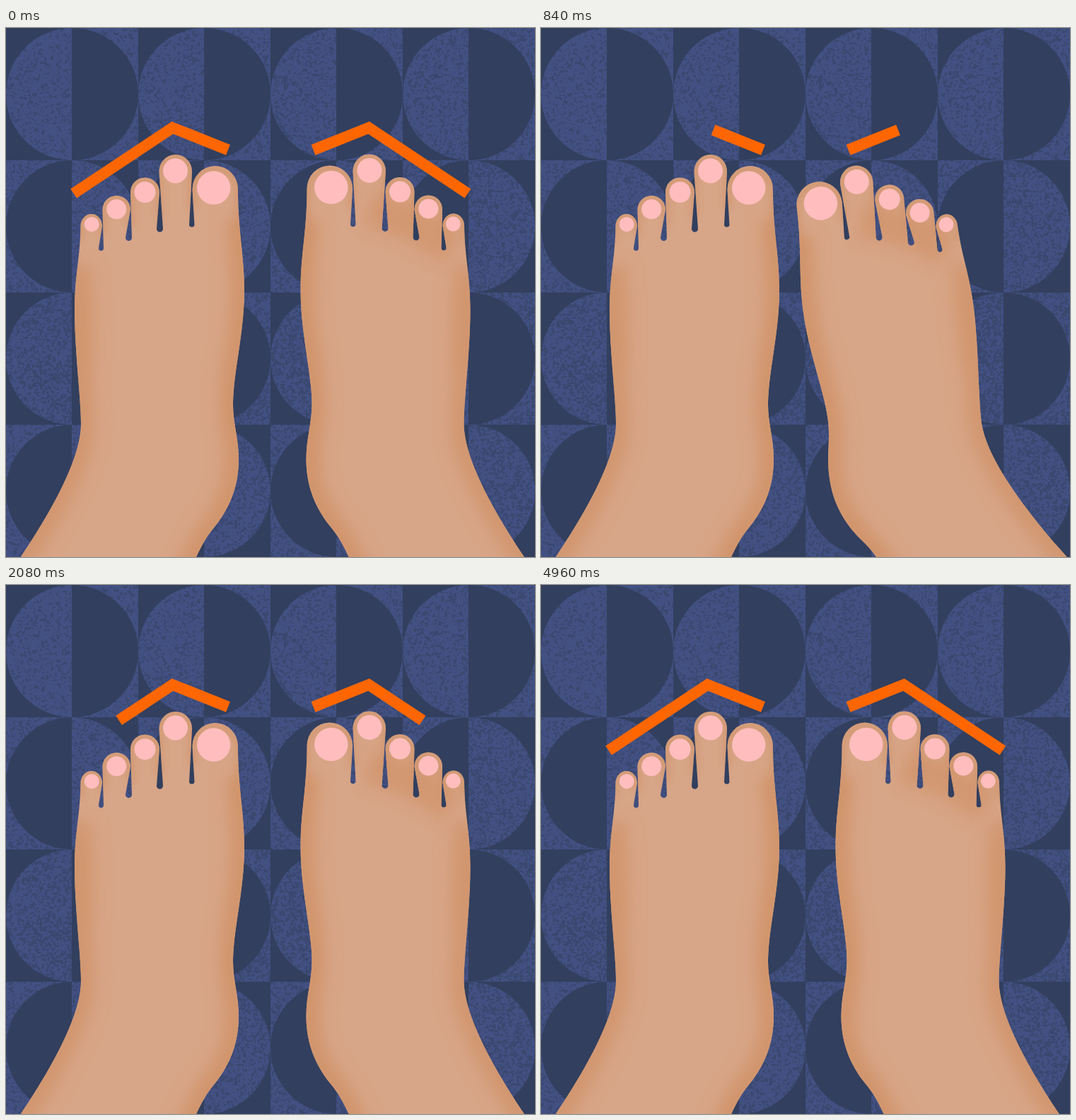
These frames come from a looping animation (748 by 748 pixels, 5000 ms). An HTML page with a canvas:

```html
<!DOCTYPE html>
<html lang="en">
<head>
<meta charset="utf-8">
<title>Feet</title>
<style>
  html, body { margin: 0; width: 100%; height: 100%; overflow: hidden; background: #323f5e; }
  canvas, svg { position: absolute; left: 0; top: 0; width: 748px; height: 748px; display: block; }
</style>
</head>
<body>
<canvas id="tiles" width="748" height="748"></canvas>
<svg viewBox="0 0 748 748">
  <defs>
    <path id="outline" d="M-49 850L21 748C57 694 106 613 106 560C106 525 97 455 97 400C97 350 105 325 105.5 280
      A15.25 17 0 0 1 136 280L131 311A3.5 3.5 0 0 0 138 312
      L136.5 257A19.75 20 0 0 1 176 257L169 296A4.5 4.5 0 0 0 178 297
      L176 232A20.5 20.5 0 0 1 217 232L213 284A4.5 4.5 0 0 0 222 284
      L216.5 203A23.25 24 0 0 1 263 203L259 279A4 4 0 0 0 266.5 279
      L263.5 228A32.25 33 0 0 1 328 228
      C328 290 337 320 337 372C337 430 321 490 321 532C321 560 329 580 329 610C329 650 315 680 296 704C284 718 277 731 269 748L226 835Z"/>
    <clipPath id="skin"><use href="#outline"/></clipPath>
    <filter id="soft" filterUnits="userSpaceOnUse" x="-60" y="150" width="460" height="720"><feGaussianBlur stdDeviation="11"/></filter>
    <filter id="fine" filterUnits="userSpaceOnUse" x="60" y="150" width="300" height="200"><feGaussianBlur stdDeviation="4"/></filter>
    <g id="foot">
      <use href="#outline" fill="#d7a587"/>
      <g clip-path="url(#skin)" fill="none" stroke="#d1946c">
        <g filter="url(#soft)" stroke-width="40">
          <path d="M-49 850L21 748C57 694 106 613 106 560C106 525 97 455 97 400C97 375 101 355 103 335" opacity=".85"/>
          <path d="M330 270C333 310 337 330 337 372C337 430 321 490 321 532C321 560 329 580 329 610C329 650 315 680 296 704C284 718 277 731 269 748L226 835"/>
          <path d="M112 370V480" stroke-width="28" opacity=".6"/>
        </g>
        <g filter="url(#fine)" stroke-width="9" opacity=".75">
          <path d="M105 300V280A15.25 17 0 0 1 136 280V292M137 280V257A19.75 20 0 0 1 176 257V280M177 275V232A20.5 20.5 0 0 1 217 232V268M217 268V203A23.25 24 0 0 1 263 203V255M264 255V228A32.25 33 0 0 1 328 228V290"/>
        </g>
      </g>
    </g>
    <g id="nails" fill="#ffbdbd">
      <circle cx="121.2" cy="277.7" r="10.5"/>
      <circle cx="156.2" cy="256.3" r="14"/>
      <circle cx="196.5" cy="232.2" r="15"/>
      <circle cx="239.5" cy="202" r="17.5"/>
      <circle cx="293.7" cy="226" r="23.7"/>
    </g>
    <path id="chevron" d="M314 172.3L235.5 141L95.6 234"/>
  </defs>
  <use href="#foot"/>
  <use href="#nails"/>
  <g id="right">
    <g transform="translate(753.5 -.6) scale(-1 1)">
      <use href="#foot"/>
      <g clip-path="url(#skin)">
        <path d="M240 255L175 278L122 312" fill="none" stroke="#d1946c" stroke-width="50" opacity=".8" filter="url(#soft)"/>
      </g>
      <use href="#nails"/>
    </g>
  </g>
  <g id="marks" fill="none" stroke="#ff6600" stroke-width="15.8" stroke-miterlimit="8">
    <use href="#chevron"/>
    <use href="#chevron" transform="translate(748.5 0) scale(-1 1)"/>
  </g>
</svg>
<script>
const LOOP = 5000, STEP = 40, TILE = 187, R = TILE / 2;
const right = document.getElementById('right');
const marks = document.getElementById('marks');
const fullLength = document.getElementById('chevron').getTotalLength();
const clamp = v => Math.max(0, Math.min(1, v));

// Half circles in alternating rows, with seeded speckles on the lighter colour.
function drawTiles() {
  const size = 748, cell = 2.2, cols = Math.ceil(size / cell) + 2;
  let seed = 7;
  const rand = () => (seed = (seed * 16807) % 2147483647) / 2147483647;
  const grid = Float32Array.from({ length: cols * cols }, rand);
  const noise = (x, y) => {
    const gx = x / cell, gy = y / cell, ix = Math.floor(gx), iy = Math.floor(gy);
    const fx = gx - ix, fy = gy - iy, i = iy * cols + ix;
    const top = grid[i] + (grid[i + 1] - grid[i]) * fx;
    const low = grid[i + cols] + (grid[i + cols + 1] - grid[i + cols]) * fx;
    return top + (low - top) * fy;
  };
  const dark = [50, 63, 94], light = [66, 80, 130];
  const density = [0.36, 0.4, 0.47, 0.42];
  const ctx = document.getElementById('tiles').getContext('2d');
  const img = ctx.createImageData(size, size);
  for (let y = 0; y < size; y++) {
    const row = Math.floor(y / TILE), dy = y % TILE + 0.5 - R;
    for (let x = 0; x < size; x++) {
      const dx = x % TILE + 0.5 - R;
      const inside = clamp(R - Math.hypot(dx, dy) + 0.5);
      const area = (dx < 0) === (row % 2 === 0) ? inside : 1 - inside;
      const cover = density[row] + 0.02 * Math.floor(x / TILE);
      const speck = clamp((cover - noise(x, y)) * 7 + 0.3);
      const mix = area * (1 - 0.5 * speck), p = (y * size + x) * 4;
      for (let c = 0; c < 3; c++) img.data[p + c] = dark[c] + (light[c] - dark[c]) * mix;
      img.data[p + 3] = 255;
    }
  }
  ctx.putImageData(img, 0, 0);
}

// Eased value between [time, value] keys.
function ease(keys, t) {
  const i = keys.findIndex(k => t < k[0]);
  if (i < 0) return keys[keys.length - 1][1];
  if (i === 0) return keys[0][1];
  const [t0, a] = keys[i - 1], [t1, b] = keys[i];
  const u = (t - t0) / (t1 - t0);
  return a + (b - a) * u * u * (3 - 2 * u);
}

const trim = [[0, 1], [1320, 0], [2520, 1], [3720, 0], [4960, 1]];
const turn = [[320, 0], [1200, -11.08], [2080, 0]];

function render(ms) {
  const t = Math.floor((ms % LOOP) / STEP) * STEP;
  right.setAttribute('transform', `rotate(${ease(turn, t)} 611 760)`);
  marks.setAttribute('stroke-dasharray', `${ease(trim, t) * (fullLength + 0.1)} 999`);
}

drawTiles();
const start = performance.now();
function tick(now) {
  render(Math.max(0, now - start));
  requestAnimationFrame(tick);
}
render(0);
requestAnimationFrame(tick);
</script>
</body>
</html>
```
